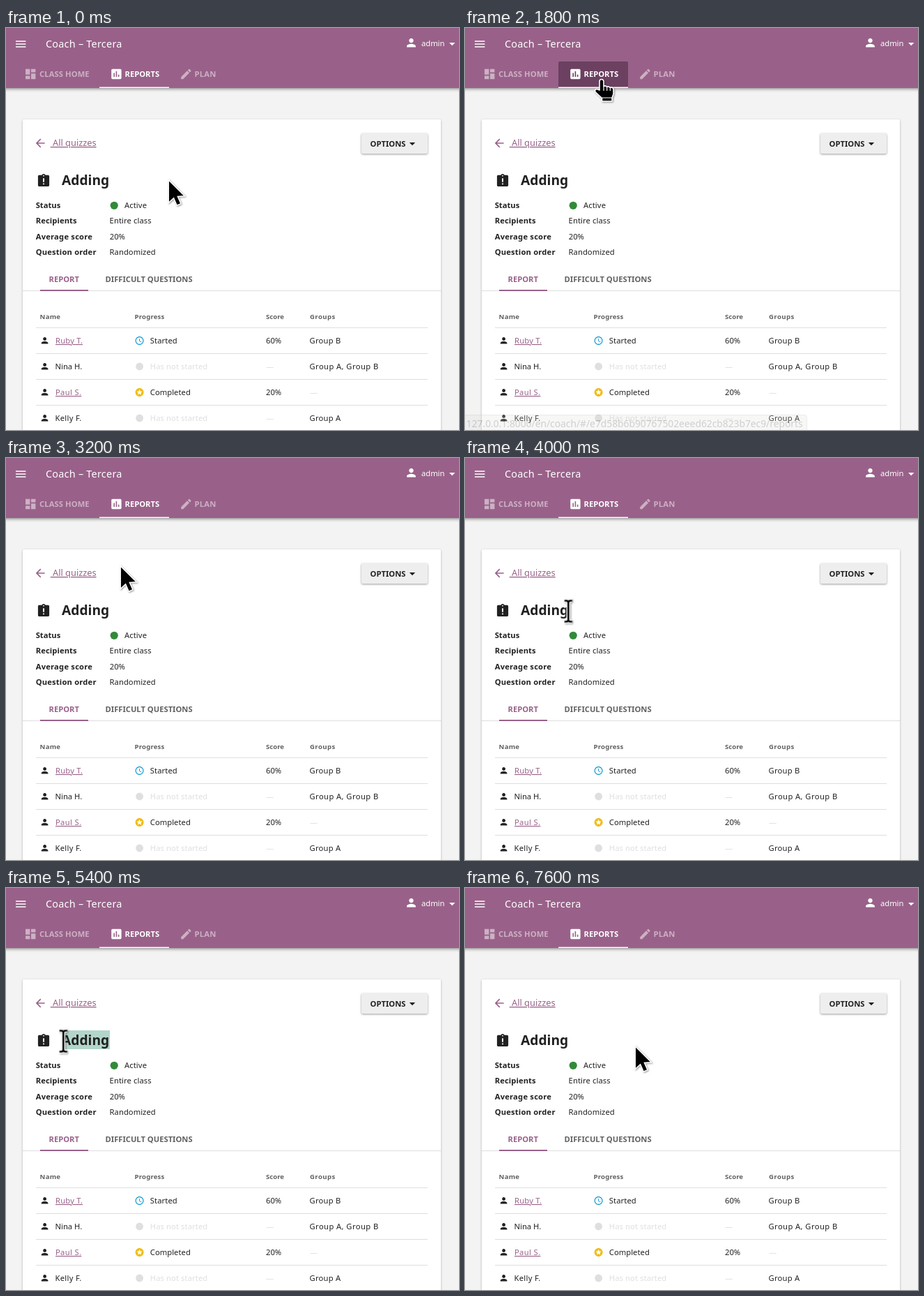
Recreate the animation shown at these times as an HTML page. Size 650 by 576 pixels, loop 8 s.

```html
<!DOCTYPE html>
<html lang="en">
<head>
<meta charset="utf-8">
<title>Coach reports</title>
<style>
html, body { margin: 0; width: 100%; height: 100%; overflow: hidden; background: #f3f3f3; }
svg { display: block; }
text { font: 11.2px "Noto Sans", "Open Sans", sans-serif; fill: #212121; white-space: pre; }
.b { font-weight: 700; }
.th { font-weight: 700; font-size: 9.6px; fill: #616161; }
.link { fill: #996189; text-decoration: underline; }
.off { fill: #dfdfdf; }
.on { fill: #fff; }
.dim { fill: #fff; fill-opacity: .5; }
.h1 { font-size: 19.2px; font-weight: 700; }
.rule { stroke: #dedede; }
.card { filter: drop-shadow(0 1px 1.5px rgba(0,0,0,.3)); }
.bar { filter: drop-shadow(0 1px 2.5px rgba(0,0,0,.5)); }
.btn { filter: drop-shadow(0 1.5px 1.5px rgba(0,0,0,.4)); }

.hover, .status, .sel, .cursor, .cursor g { animation: 8s step-end infinite; }
.hover { animation-name: hover; }
.status { animation-name: status; }
.sel { fill: #b3d6ca; animation-name: selRest; }
.sel.first { animation-name: selFirst; }
.cursor { animation-name: move; filter: drop-shadow(1px 1.5px 1px rgba(0,0,0,.4)); }
.cursor .arrow { animation-name: arrow; }
.cursor .hand { animation-name: hand; }
.cursor .beam { animation-name: beam; }

@keyframes hover { 0%, 37.5%, 100% { opacity: 0 } 20%, 35% { opacity: .06 } 22.5% { opacity: 1 } }
@keyframes status { 0%, 40%, 100% { opacity: 0 } 22.5% { opacity: .22 } 25% { opacity: 1 } 37.5% { opacity: .35 } }
@keyframes selRest { 0%, 95%, 100% { opacity: 0 } 57.5% { opacity: 1 } }
@keyframes selFirst { 0%, 95%, 100% { opacity: 0 } 67.5% { opacity: 1 } }
@keyframes arrow { 0%, 32.5%, 92.5%, 100% { opacity: 1 } 20%, 45% { opacity: 0 } }
@keyframes hand { 0%, 32.5%, 100% { opacity: 0 } 20% { opacity: 1 } }
@keyframes beam { 0%, 92.5%, 100% { opacity: 0 } 45% { opacity: 1 } }
@keyframes move {
  0% { transform: translate(232px, 216px) }
  7.5% { transform: translate(210px, 208px) }
  10% { transform: translate(178px, 192px) }
  12.5% { transform: translate(155px, 180px) }
  15% { transform: translate(139px, 167px) }
  17.5% { transform: translate(183px, 89px) }
  20% { transform: translate(184px, 75px) }
  22.5% { transform: translate(185px, 72px) }
  25% { transform: translate(184px, 69px) }
  32.5% { transform: translate(191px, 79px) }
  35% { transform: translate(184px, 111px) }
  37.5% { transform: translate(175px, 127px) }
  40% { transform: translate(163px, 153px) }
  42.5% { transform: translate(151px, 195px) }
  45% { transform: translate(143px, 185px) }
  47.5% { transform: translate(140px, 200px) }
  50% { transform: translate(140px, 201px) }
  57.5% { transform: translate(88px, 200px) }
  60% { transform: translate(80px, 200px) }
  62.5% { transform: translate(75px, 201px) }
  67.5% { transform: translate(74px, 201px) }
  87.5% { transform: translate(77px, 201px) }
  90% { transform: translate(129px, 205px) }
  92.5% { transform: translate(238px, 225px) }
  95%, 100% { transform: translate(243px, 225px) }
}
</style>
</head>
<body>
<svg width="650" height="576" viewBox="0 0 650 576">
  <defs>
    <path id="person" d="M12 12c2.21 0 4-1.79 4-4s-1.79-4-4-4-4 1.79-4 4 1.79 4 4 4zm0 2c-2.67 0-8 1.34-8 4v2h16v-2c0-2.66-5.33-4-8-4z"/>
    <path id="ibeam" d="M-5.5-15H-3Q0-15 0-12V12Q0 15-3 15H-5.5M5.5-15H3Q0-15 0-12M5.5 15H3Q0 15 0 12" fill="none"/>
  </defs>

  <!-- app bar -->
  <rect class="bar" x="-10" y="-10" width="670" height="96" fill="#996189"/>
  <rect class="hover" x="134" y="48" width="100" height="38" rx="2" fill="#6b4060"/>
  <rect x="134" y="84.5" width="100" height="1.5" fill="#fff"/>
  <path class="on" transform="translate(11.6 13.4) scale(.8)" d="M3 18h18v-2H3v2zm0-5h18v-2H3v2zm0-7v2h18V6H3z"/>
  <text class="on" x="57" y="28" style="font-size:14.4px" letter-spacing=".25">Coach – Tercera</text>
  <use class="on" href="#person" transform="translate(571.9 11.6) scale(.8)"/>
  <text class="on" x="596" y="26">admin</text>
  <path class="on" d="M636 21h8.4l-4.2 4.2z"/>
  <path class="dim" transform="translate(25.6 56.4) scale(.8)" d="M3 13h8V3H3v10zm0 8h8v-6H3v6zm10 0h8V11h-8v10zm0-18v6h8V3h-8z"/>
  <text class="b dim" x="48" y="70" letter-spacing=".1">CLASS HOME</text>
  <path class="on" transform="translate(148.8 56.4) scale(.8)" d="M19 3H5c-1.1 0-2 .9-2 2v14c0 1.1.9 2 2 2h14c1.1 0 2-.9 2-2V5c0-1.1-.9-2-2-2zM9 17H7v-7h2v7zm4 0h-2V7h2v10zm4 0h-2v-4h2v4z"/>
  <text class="b on" x="170.5" y="70">REPORTS</text>
  <path class="dim" transform="translate(248.8 56.4) scale(.8)" d="M3 17.25V21h3.75L17.81 9.94l-3.75-3.75L3 17.25zM20.71 7.04c.39-.39.39-1.02 0-1.41l-2.34-2.34c-.39-.39-1.02-.39-1.41 0l-1.83 1.83 3.75 3.75 1.83-1.83z"/>
  <text class="b dim" x="270.5" y="70" letter-spacing=".25">PLAN</text>

  <!-- card -->
  <rect class="card" x="24" y="131" width="600" height="470" rx="2" fill="#fff"/>
  <path fill="#996189" transform="translate(39.6 155.4) scale(.8)" d="M20 11H7.83l5.59-5.59L12 4l-8 8 8 8 1.41-1.41L7.83 13H20v-2z"/>
  <text class="link" x="63.7" y="169" style="font-size:12.8px"> All quizzes</text>
  <rect class="btn" x="510" y="151" width="95" height="29" rx="2" fill="#eee"/>
  <text class="b" x="522.5" y="170">OPTIONS</text>
  <path fill="#212121" d="M578.8 164h8.4l-4.2 4.2z"/>

  <path fill="#212121" transform="translate(43.2 208.1) scale(.9)" d="M19 3h-4.18C14.4 1.84 13.3 1 12 1c-1.3 0-2.4.84-2.82 2H5c-1.1 0-2 .9-2 2v14c0 1.1.9 2 2 2h14c1.1 0 2-.9 2-2V5c0-1.1-.9-2-2-2zm-6 15h-2v-2h2v2zm0-4h-2V8h2v6zm-1-9c-.55 0-1-.45-1-1s.45-1 1-1 1 .45 1 1-.45 1-1 1z"/>
  <rect class="sel first" x="80" y="204" width="13" height="27"/>
  <rect class="sel" x="93" y="204" width="56" height="27"/>
  <text class="h1" x="80" y="225">Adding</text>

  <text class="b" x="42.7" y="258">Status</text>
  <text class="b" x="42.7" y="280" letter-spacing=".1">Recipients</text>
  <text class="b" x="42.7" y="303" letter-spacing=".22">Average score</text>
  <text class="b" x="42.7" y="325" letter-spacing=".18">Question order</text>
  <circle cx="155.2" cy="254.3" r="5.6" fill="#328a39"/>
  <text x="170" y="258" letter-spacing=".1">Active</text>
  <text x="148.6" y="280" letter-spacing=".1">Entire class</text>
  <text x="148.8" y="303">20%</text>
  <text x="148.6" y="325" letter-spacing=".05">Randomized</text>

  <!-- tabs -->
  <path class="rule" d="M24 376.5H624"/>
  <rect x="49" y="375" width="69" height="2" fill="#996189"/>
  <text class="b" x="61.5" y="364" style="fill:#996189">REPORT</text>
  <text class="b" x="142.5" y="364" style="fill:#616161">DIFFICULT QUESTIONS</text>

  <!-- table -->
  <text class="th" x="48.6" y="417" letter-spacing=".25">Name</text>
  <text class="th" x="184.6" y="417" letter-spacing=".15">Progress</text>
  <text class="th" x="373" y="417">Score</text>
  <text class="th" x="436" y="417" letter-spacing=".4">Groups</text>
  <path class="rule" d="M43 429.5H605M43 466.5H605M43 503.5H605M43 540.5H605"/>
  <g fill="#212121">
    <use href="#person" transform="translate(48.4 440.6) scale(.6)"/>
    <use href="#person" transform="translate(48.4 477.6) scale(.6)"/>
    <use href="#person" transform="translate(48.4 514.6) scale(.6)"/>
    <use href="#person" transform="translate(48.4 551.6) scale(.6)"/>
  </g>

  <text class="link" x="71" y="452" letter-spacing=".2">Ruby T.</text>
  <path fill="#0d9ad0" transform="translate(184.4 440.8) scale(.6)" d="M11.99 2C6.47 2 2 6.48 2 12s4.47 10 9.99 10C17.52 22 22 17.52 22 12S17.52 2 11.99 2zM12 20c-4.42 0-8-3.58-8-8s3.58-8 8-8 8 3.58 8 8-3.58 8-8 8zm.5-13H11v6l5.25 3.15.75-1.23-4.5-2.67z"/>
  <text x="206.8" y="452" letter-spacing=".1">Started</text>
  <text x="373" y="452">60%</text>
  <text x="435.5" y="452" letter-spacing=".25">Group B</text>

  <text x="70.5" y="489">Nina H.</text>
  <circle class="off" cx="191.6" cy="485" r="5.4"/>
  <text class="off" x="206.8" y="489" letter-spacing=".1">Has not started</text>
  <text class="off" x="373" y="489">—</text>
  <text x="435.5" y="489" letter-spacing=".42">Group A, Group B</text>

  <text class="link" x="71" y="526" letter-spacing=".35">Paul S.</text>
  <path fill="#f0bd16" transform="translate(184.4 514.8) scale(.6)" d="M11.99 2C6.47 2 2 6.48 2 12s4.47 10 9.99 10C17.52 22 22 17.52 22 12S17.52 2 11.99 2zm4.24 16L12 15.45 7.77 18l1.12-4.81-3.73-3.23 4.92-.42L12 5l1.92 4.53 4.92.42-3.73 3.23L16.23 18z"/>
  <text x="206.8" y="526" letter-spacing=".05">Completed</text>
  <text x="373" y="526">20%</text>
  <text class="off" x="436" y="526">—</text>

  <text x="70.5" y="563" letter-spacing=".3">Kelly F.</text>
  <circle class="off" cx="191.6" cy="559" r="5.4"/>
  <text class="off" x="206.8" y="563" letter-spacing=".1">Has not started</text>
  <text class="off" x="373" y="563">—</text>
  <text x="435.5" y="563" letter-spacing=".25">Group A</text>

  <!-- link address bar -->
  <g class="status">
    <path d="M-2 554.5H486.5a4 4 0 0 1 4 4V580H-2z" fill="#dcdcda" stroke="#a6a6a2"/>
    <text x="1.8" y="572" style="font-size:13.8px;fill:#2a2a2a">127.0.0.1:8000/en/coach/#/e7d58b6b90767502eeed62cb823b7ec9/reports</text>
  </g>

  <!-- pointer -->
  <g class="cursor">
    <g class="arrow">
      <path d="M1.2 1.6V34.6L8.6 27.8 13.2 38.2 19 35.6 14.4 25.4 24.4 24.8z" stroke="#fff" stroke-width="1.5"/>
    </g>
    <g class="hand">
      <path d="M8 17V4.5a3 3 0 0 1 6 0V11.5q2.500-1.500 4.500 .8 2.500-1.200 4.500 1 5-.8 5 3.200V22.500L26 28V33H11.500V28.500L1.800 19.500Q.8 15.500 4.500 15.500z" stroke="#fff" stroke-width="1.6" stroke-linejoin="round"/>
      <path d="M14 11.500V18M18.700 12.500V18M23.300 13.500V18M11.500 28H26" fill="none" stroke="#fff" stroke-width="1.200"/>
    </g>
    <g class="beam" transform="translate(8.3 18.5)">
      <use href="#ibeam" stroke="#fff" stroke-width="5.6" stroke-linejoin="round"/>
      <use href="#ibeam" stroke="#000" stroke-width="2.6"/>
    </g>
  </g>
</svg>
</body>
</html>
```
